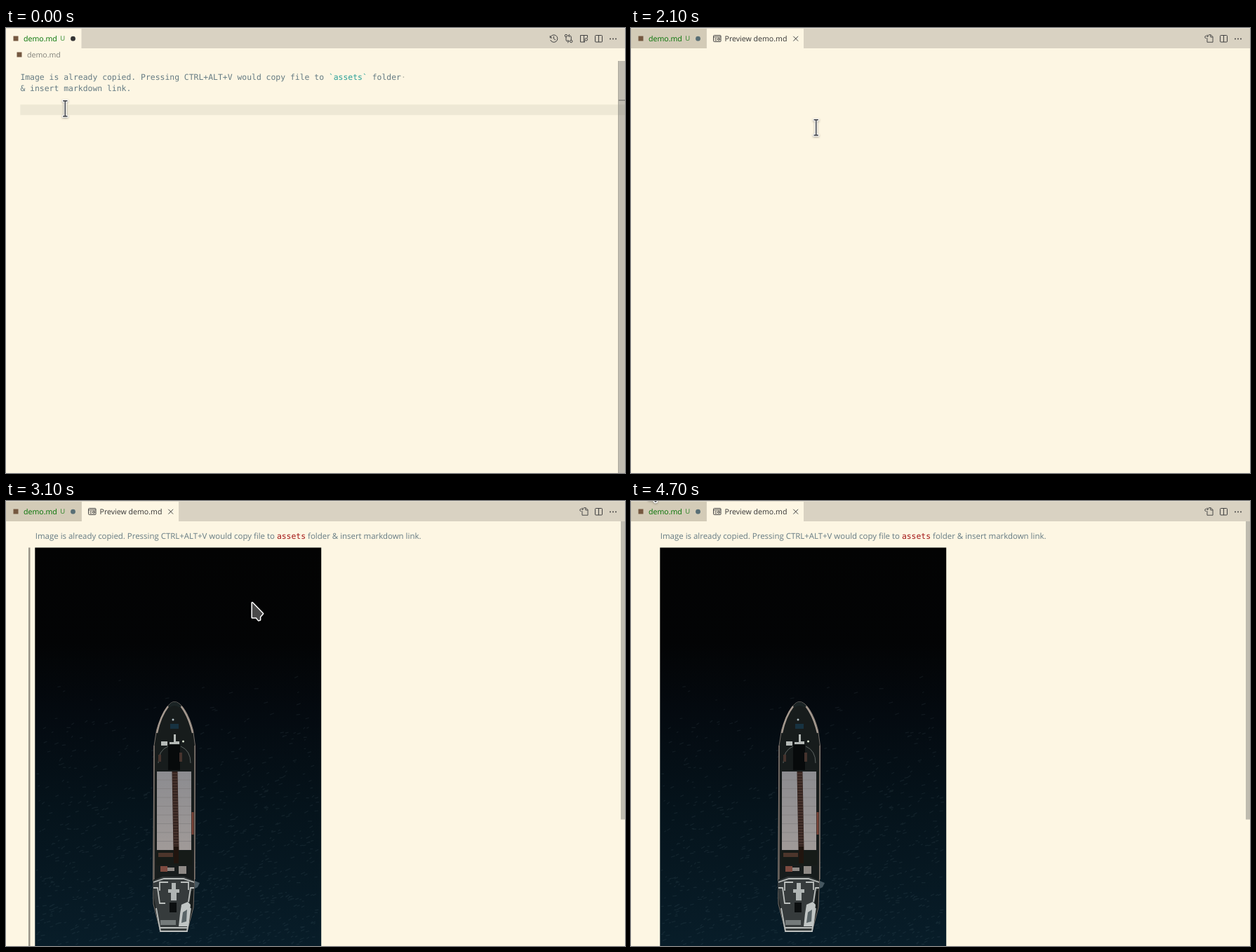
An HTML page for the animation above (4900 ms loop, 882 px wide and 635 px high).

```html
<!DOCTYPE html>
<html lang="en">
<head>
<meta charset="utf-8">
<title>Paste image as markdown link</title>
<style>
  html, body { margin: 0; width: 100%; height: 100%; overflow: hidden; background: #fdf6e3; }
  svg { display: block; width: 882px; height: 635px; }
  text { white-space: pre; text-rendering: geometricPrecision; }
  .ui { font: 10.6px "Open Sans", "Noto Sans", sans-serif; }
  .body { font: 11.44px "Open Sans", "Noto Sans", sans-serif; fill: #657b83; }
  .code { font: 11.42px "DejaVu Sans Mono", monospace; fill: #657b83; }
  .icon { fill: none; stroke: #424242; stroke-width: 1; stroke-linejoin: round; }
  .cursor { filter: drop-shadow(0 1px 1.5px rgba(0, 0, 0, .35)); }
  .hidden { display: none; }
</style>
</head>
<body>
<svg viewBox="0 0 882 635" xmlns="http://www.w3.org/2000/svg">
  <defs>
    <linearGradient id="sea" x1="0" y1="0" x2="0" y2="1">
      <stop offset="0" stop-color="#030303"/>
      <stop offset=".24" stop-color="#030405"/>
      <stop offset=".42" stop-color="#040a10"/>
      <stop offset=".65" stop-color="#05131b"/>
      <stop offset="1" stop-color="#081d29"/>
    </linearGradient>
    <linearGradient id="hold" x1="0" y1="0" x2="0" y2="1">
      <stop offset="0" stop-color="#8c8c90"/>
      <stop offset="1" stop-color="#a09a98"/>
    </linearGradient>
    <g id="split" class="icon"><rect x="839.5" y="10.5" width="10" height="9.5" rx="1"/><path d="M844.5 10.5v9.5"/></g>
    <g id="more" fill="#424242"><circle cx="861" cy="15.5" r="1"/><circle cx="865" cy="15.5" r="1"/><circle cx="869" cy="15.5" r="1"/></g>
  </defs>

  <rect width="882" height="635" fill="#fdf6e3"/>
  <rect width="882" height="29" fill="#d9d2c2"/>
  <rect width="882" height="1" fill="#e6e0d1"/>
  <rect id="fileTab" y="1" width="107.5" height="28"/>
  <rect x="10.5" y="11.5" width="7" height="7" fill="#755840"/>
  <g class="ui" fill="#007100">
    <text x="25" y="18.8">demo.md</text>
    <text x="77.2" y="18.4" font-size="9.5" opacity=".8">U</text>
  </g>
  <circle id="dirty" cx="95.5" cy="15.2" r="3.4"/>
  <use href="#split"/>
  <use href="#more"/>

  <g id="editor">
    <g class="icon">
      <path d="M775.3 11v3h3M775.6 13.8a5.2 5.2 0 1 1 .2 3.2M780.5 12v3.4l2.5 1.6"/>
      <circle cx="798" cy="11" r="1.7"/><circle cx="805.3" cy="19" r="1.7"/>
      <path d="M798 12.7v4.3q0 2 2 2h2M800.2 16.9l2.1 2.1-2.1 2.1M805.3 17.3V13q0-2-2-2h-2M803.2 8.9L801.1 11l2.1 2.1"/>
      <path d="M825 20h-6.5v-9.5h10V14M823.5 10.5V20"/><circle cx="826.7" cy="16.3" r="1.8"/><path d="M825.4 17.7l-1.9 2"/>
    </g>
    <rect x="15.5" y="34.5" width="7" height="7" fill="#755840"/>
    <text class="ui" x="30" y="41.9" fill="#80807a">demo.md</text>
    <rect x="20.3" y="109.3" width="861.7" height="15" fill="#eee8d5"/>
    <text class="code" x="20.4" y="74">Image is already copied. Pressing CTRL+ALT+V would copy file to <tspan fill="#2aa198">`assets`</tspan> folder<tspan fill="#b3b3a5">·</tspan></text>
    <text class="code" x="20.4" y="89.6">&amp; insert markdown link.</text>
    <g id="link">
      <g fill="#006400" fill-opacity=".1" stroke="#b9b9b9">
        <rect x="41.5" y="109.8" width="6" height="14"/><rect x="302.5" y="109.8" width="6" height="14"/>
      </g>
      <text class="code" x="20.4" y="120.8">![](assets/images/2022-03-31-14-26-41.png)</text>
      <rect id="underline" x="47.9" y="122.8" width="254" height="1" fill="#657b83"/>
    </g>
    <rect id="caret" y="109.3" width="1.6" height="15" fill="#4f636b"/>
    <rect x="872" y="47" width="10" height="588" fill="#646464" fill-opacity=".4"/>
    <path d="M872.5 47v588" stroke="#a9a598" stroke-width=".8"/>
    <rect x="873" y="102.5" width="9" height="1.3" fill="#77766f"/>
    <rect id="mark" x="876.5" y="104" width="3.5" height="12.5" fill="#85847c"/>
  </g>

  <g id="preview">
    <rect x="108" y="1" width="138" height="28" fill="#fdf6e3"/>
    <g class="icon">
      <rect x="117.5" y="10.5" width="10.5" height="9" rx="1"/>
      <path d="M117.5 12.7H128M119.3 15h3M119.3 17.3h3"/><rect x="123.8" y="14.7" width="2.5" height="2.6"/>
      <path d="M231.3 11.8l6.8 6.8M238.1 11.8l-6.8 6.8"/>
      <path transform="translate(816.5 8.5) scale(.81)" stroke-width="1.15" d="M5.5 7V14.500H15.500V5L12 1.500H8M11.500 1.500V5.500H15.500M4 7.500H3.500a2 2 0 0 1 0-4H7.500M5.500 1.300L7.700 3.500 5.500 5.700"/>
    </g>
    <text class="ui" x="133.6" y="18.8" fill="#333">Preview demo.md</text>
    <g id="page">
      <text class="body" x="41.8" y="53.5">Image is already copied. Pressing CTRL+ALT+V would copy file to <tspan class="code" style="fill:#a31515">assets</tspan> folder &amp; insert markdown link.</text>
      <rect id="hoverBar" x="32" y="66.5" width="2.5" height="568.5" fill="#989488"/>
      <rect x="876" y="29" width="6" height="425.5" fill="#bfbbaf"/>
      <rect x="41.3" y="66.5" width="407.9" height="568.5" fill="url(#sea)"/>
      <path id="waves" fill="none" stroke="#8fb0bd" stroke-opacity=".09" stroke-width="1.2"/>
      <g id="ship">
        <path d="M240 286.5C232 286.5 222 302 214.5 327L211 349 209.5 540 210 575 220 614.5H258L267 580 268.5 540 269.5 349 266.5 327C260 302 249 286.5 240 286.5z" fill="#171c1c" stroke="#77706a"/>
        <path d="M230.5 293q9.5-13 19.5 0l-3 1.5q-7-5-14 0z" fill="#1b2425"/>
        <path d="M231 293q-11 14-16 38M249.500 293q11 14 16.500 38" fill="none" stroke="#a5998f" stroke-width="2.4"/>
        <path d="M211 349V540M269 349V540" stroke="#8a7d75" stroke-width="1.2"/>
        <path d="M217 374q0-18 14-24M263 374q0-18-14-24" fill="none" stroke="#6c7471" stroke-width=".8"/>
        <path d="M234 318h12v7h-12z" fill="#173241"/>
        <path d="M221 343h9v6h-9zM239 333h3v10h5v4h-14v-3h6z" fill="#b5bab7"/>
        <circle cx="252.500" cy="343" r="1.5" fill="#d9e3cf"/><circle cx="238" cy="312" r="1.5" fill="#aebbc0"/>
        <path d="M231 348h17v36h-17z" fill="#070a0b"/>
        <path d="M217 362h4v10h-4zM247 359h4v13h-4z" fill="#45332d"/>
        <rect x="215" y="386" width="49" height="112" fill="url(#hold)"/>
        <g id="ribs" stroke="#827f80" stroke-width=".7"></g>
        <path d="M236.500 386h8l2 112h-8z" fill="#33231f"/>
        <path id="ladder" stroke="#5c443c" stroke-width="1"/>
        <path d="M264.500 444h3v32h-3z" fill="#7a4438"/>
        <path d="M214 499h51v21h-51z" fill="#161b18"/>
        <path d="M217 502h21v6h-21z" fill="#4c352b"/><path d="M239 493h7v24h-7z" fill="#21150f"/>
        <path d="M220 521h10v8h-10z" fill="#7e4b40"/><path d="M230 523h10v5h-10zM246 521h11v11h-11z" fill="#8f8a86"/>
        <path d="M209 542l14-6h31l14 6v10l-4 5-3 22-3 36h-38l-3-10-4-26-4-25z" fill="#363b3c"/>
        <path d="M210 544l15-5h28l15 5M210 552h6l3 22h8M268 552h-5l-3 20M219 556v-12h12M249 544h11v11M214 581l6 33h38l5-33M220 609h38" fill="none" stroke="#bcc0be" stroke-width="1.8"/>
        <path d="M236 545h6v9h5v5h-4v11h-8v-11h-4v-5h5z" fill="#b0b5b4"/>
        <path d="M233 573h10v14h-10z" fill="#0c0f10"/>
        <path d="M250 576l9-4 4 4-3 31h-14l2-18z" fill="#c0c5c4"/><path d="M252 587l6-4-1 17-7 2z" fill="#596467"/>
        <path d="M220 598h22v7h-22z" fill="#747a7a"/>
        <path d="M269 542l7 3-3 6-4 2z" fill="#607079" opacity=".7"/>
      </g>
    </g>
  </g>

  <g id="beam" class="cursor" fill="none" stroke-linecap="square">
    <path d="M-2.500-11H2.500M-2.500 11H2.500M0-11V11" stroke="#fff" stroke-width="3.6"/>
    <path d="M-2.500-11H2.500M-2.500 11H2.500M0-11V11" stroke="#34363a" stroke-width="1.4"/>
  </g>
  <path id="arrow" class="cursor" d="M0 0V21H5.800L9 24.800 11 24.200V19.800L15 15.500z" fill="#4a4a4a" stroke="#fff" stroke-width="3" stroke-linejoin="round" paint-order="stroke"/>
</svg>
<script>
const LOOP = 4900, STEP = 100;
const $ = id => document.getElementById(id);
const show = (id, on) => $(id).classList.toggle('hidden', !on);
const ease = p => p * p * (3 - 2 * p);

// Pointer stops: time, x, y
const stops = [
  [300, 84.3, 115], [800, 125.7, 124], [900, 126, 126], [1500, 263.7, 142],
  [2100, 263.7, 142], [2200, 263, 143], [3000, 263, 143], [3300, 602, 152],
  [3900, 602, 152], [4000, 603, 153], [4500, 122, 17], [4700, 25.5, -23]
];

function pointerAt(t) {
  const i = stops.findIndex(s => s[0] > t);
  if (i === 0) return stops[0].slice(1);
  if (i < 0) return stops[stops.length - 1].slice(1);
  const [t0, x0, y0] = stops[i - 1], [t1, x1, y1] = stops[i];
  const p = ease((t - t0) / (t1 - t0));
  return [x0 + (x1 - x0) * p, y0 + (y1 - y0) * p];
}

function caretOn(t) {
  return t < 800 ? t >= 200 && t < 700 : Math.floor((t - 800) / 500) % 2 === 0;
}

function randomFrom(seed) {
  return () => (seed = (seed * 16807) % 2147483647) / 2147483647;
}

function buildDeck() {
  let ribs = '', rungs = '';
  for (let y = 398; y < 498; y += 12.5) ribs += `<path d="M215 ${y}h49"/>`;
  for (let y = 389; y < 498; y += 4) rungs += `M${237 + (y - 386) / 56} ${y}h7`;
  $('ribs').innerHTML = ribs;
  $('ladder').setAttribute('d', rungs);
}

// Short ripples, denser towards the bottom
function buildWaves() {
  const rnd = randomFrom(7);
  let d = '';
  for (let i = 0; i < 900; i++) {
    const x = 43 + rnd() * 400, y = 250 + 384 * Math.sqrt(rnd());
    d += `M${x.toFixed(1)} ${y.toFixed(1)}l${(2 + rnd() * 4).toFixed(1)} ${(-rnd() * 3).toFixed(1)}`;
  }
  $('waves').setAttribute('d', d);
}

function render(time) {
  const t = Math.floor((time % LOOP) / STEP) * STEP;
  const preview = t >= 2100, pasted = t >= 800;
  const [x, y] = pointerAt(t);

  show('editor', !preview);
  show('preview', preview);
  show('page', t >= 2300);
  $('fileTab').setAttribute('fill', preview ? '#d3cbb7' : '#fdf6e3');
  $('dirty').setAttribute('fill', preview ? '#586e75' : '#333');

  show('link', pasted);
  show('mark', pasted);
  show('underline', t >= 1700);
  show('caret', caretOn(t));
  $('caret').setAttribute('x', pasted ? 309 : 20.3);

  show('hoverBar', t >= 3100 && y > 66);
  show('beam', t < 2200);
  show('arrow', t >= 2200);
  $(t < 2200 ? 'beam' : 'arrow').setAttribute('transform', `translate(${x} ${y})`);
}

buildDeck();
buildWaves();
const start = performance.now();
function tick() {
  render(performance.now() - start);
  requestAnimationFrame(tick);
}
tick();
</script>
</body>
</html>
```
